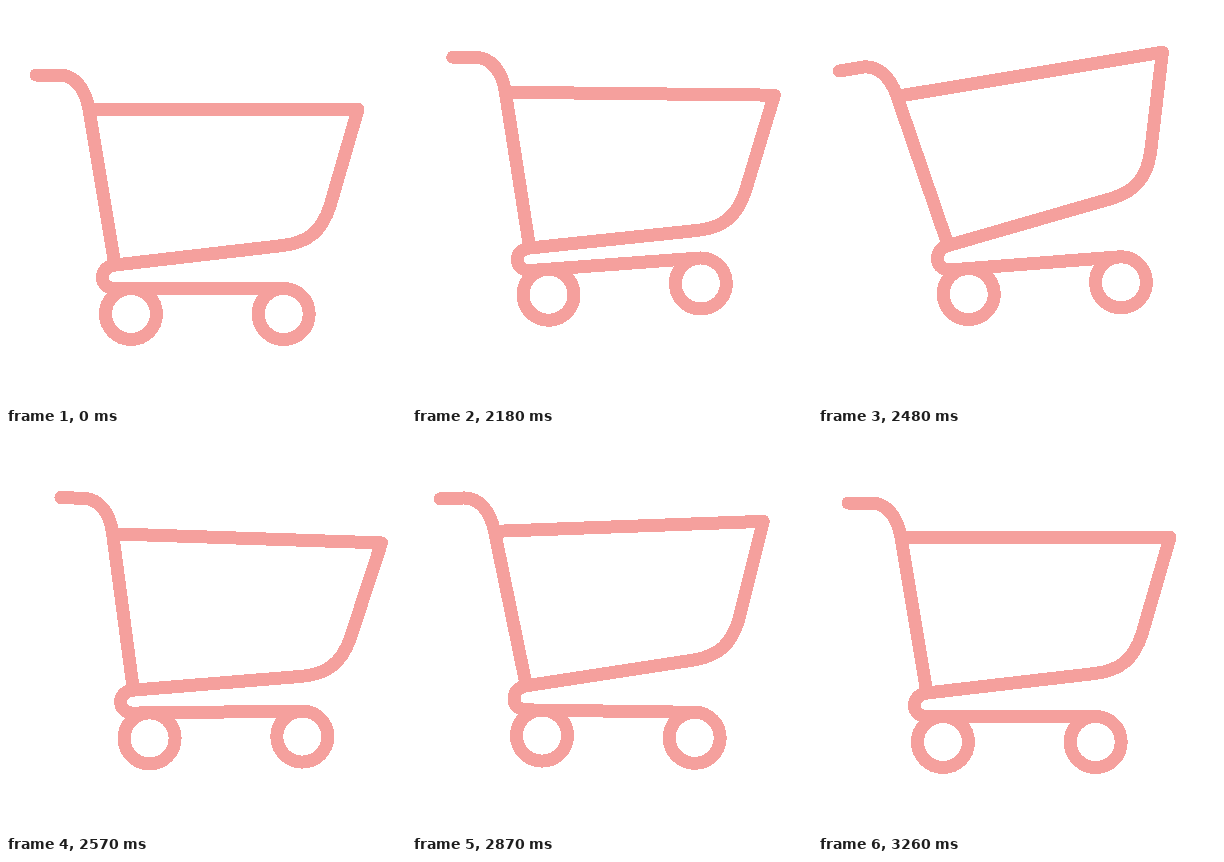
An HTML page for the animation above (3290 ms loop, 400 by 400 pixels).

```html
<!DOCTYPE html>
<html lang="en">
<head>
<meta charset="utf-8">
<title>Shopping cart</title>
<style>
  html, body { margin: 0; width: 100%; height: 100%; overflow: hidden; background: #fff; }
  svg { display: block; width: 100vw; height: 100vh; shape-rendering: crispEdges; }
  g { fill: none; stroke: #f5a09d; stroke-width: 13; stroke-linecap: round; stroke-linejoin: round; }
</style>
</head>
<body>
<svg viewBox="0 0 400 400">
  <g id="cart">
    <path d="M96.5 271.5C96.5 278 102 282.5 109 282.5H278"/>
    <circle cx="125" cy="308" r="25.5"/>
    <circle cx="277.7" cy="308" r="25.5"/>
    <g id="basket">
      <path d="M30 69H53C68 69 79.5 82 83 103.5L109 259"/>
      <path d="M83 103.5H352L324 200C316 225 302 236.5 277 239.5L109 259C101 260 96.5 265 96.5 271.5"/>
    </g>
  </g>
</svg>
<script>
const LOOP = 3290, START = 2030, STEP = 30, REST = LOOP - STEP;
const LEAN = 2000, PUSH = 2080, FAR = 2345;
const cart = document.getElementById('cart');
const basket = document.getElementById('basket');

// Each hop throws the basket forward by kick, then back to sway
const hops = [
  { from: PUSH, to: 2585, lift: 39.2, tilt: -7.25, kick: 9, sway: -5.5 },
  { from: 2585, to: 2900, lift: 15.3, tilt: 2.8, kick: 6, sway: -5.25 },
  { from: 2900, to: 3080, lift: 4, tilt: 0, kick: 2.5, sway: -2.3 },
];

const lerp = (a, b, u) => a + (b - a) * u;
const smooth = u => u * u * (3 - 2 * u);

// Quick push to the right, then a slow roll back
function shift(t) {
  if (t < PUSH) return 0;
  const u = t < FAR ? smooth((t - PUSH) / (FAR - PUSH)) : Math.exp(-(((t - FAR) / 314) ** 1.31));
  return 35.5 * u;
}

function swing(hop, next, u) {
  const turn = 0.56;
  return u < turn
    ? lerp(hop.kick, hop.sway, smooth(u / turn))
    : lerp(hop.sway, next ? next.kick : 0, ((u - turn) / (1 - turn)) ** 5);
}

function pose(t) {
  const p = { x: 0, y: 0, tilt: 0, swing: 0 };
  if (t < START || t >= REST) return p;
  p.x = shift(t);
  if (t < PUSH) p.swing = hops[0].kick * smooth((t - LEAN) / (PUSH - LEAN));
  const i = hops.findIndex(h => t >= h.from && t < h.to);
  if (i < 0) return p;
  const hop = hops[i], u = (t - hop.from) / (hop.to - hop.from);
  p.y = -4 * hop.lift * u * (1 - u);
  p.tilt = hop.tilt * Math.sin(Math.PI * u);
  p.swing = swing(hop, hops[i + 1], u);
  return p;
}

function draw(time) {
  const t = START + Math.floor((time % LOOP - START) / STEP) * STEP;
  const p = pose(t);
  cart.setAttribute('transform', `translate(${p.x} ${p.y}) rotate(${p.tilt} 201.5 308)`);
  basket.setAttribute('transform', `rotate(${p.swing} 97 267)`);
}

const begin = performance.now();
function tick() {
  draw(performance.now() - begin);
  requestAnimationFrame(tick);
}
tick();
</script>
</body>
</html>
```
